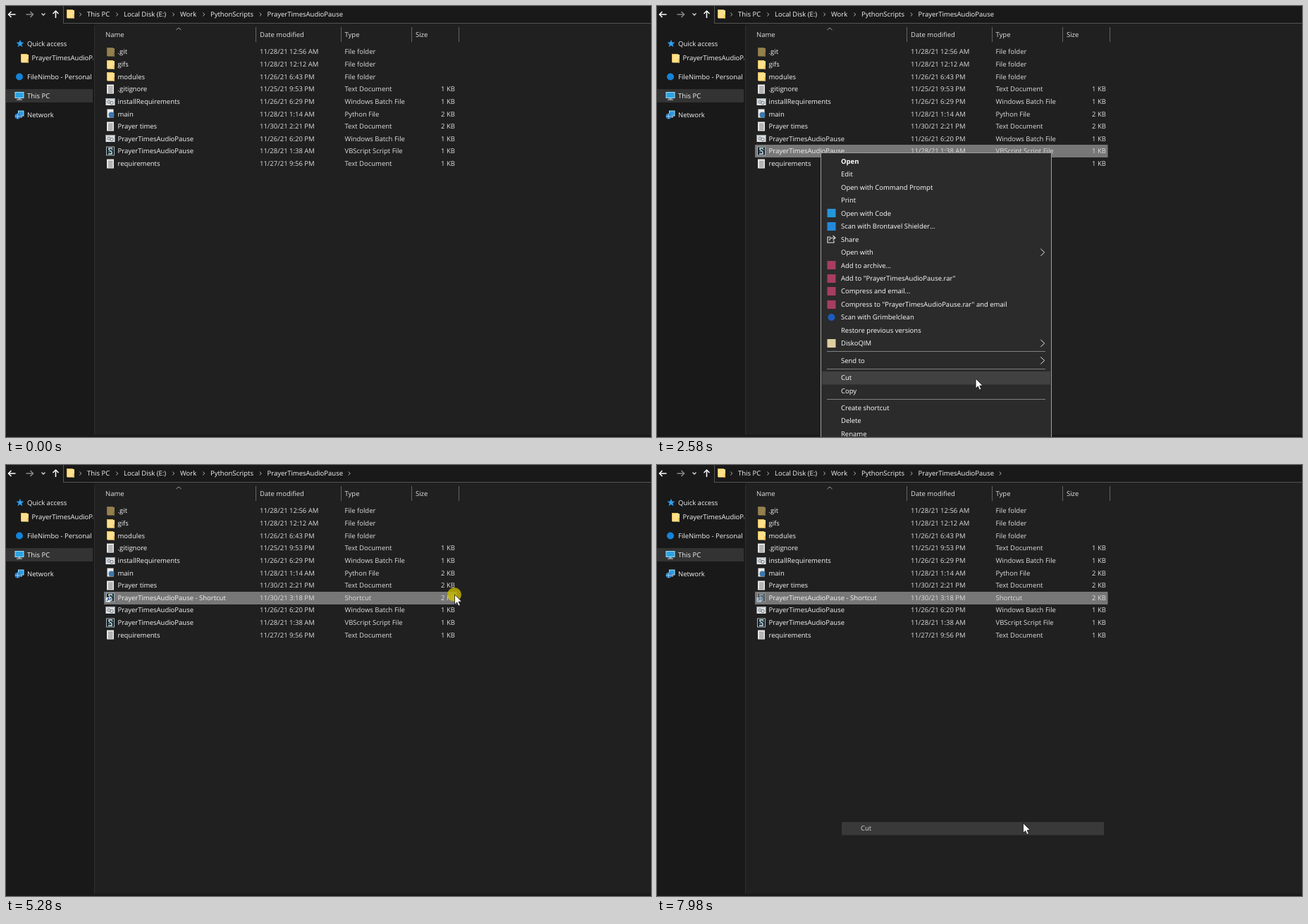
Write an HTML page with a canvas that moves like this. It is 915x612 px and loops after 8 s.

```html
<!DOCTYPE html>
<html lang="en">
<head>
<meta charset="utf-8">
<title>File manager</title>
<style>
html, body { margin: 0; width: 100%; height: 100%; overflow: hidden; background: #202020; }
canvas { display: block; }
</style>
</head>
<body>
<canvas id="stage" width="915" height="612"></canvas>
<script>
const LOOP = 8000;
const ctx = document.getElementById('stage').getContext('2d');
const FONT = '9.5px "Open Sans", "Noto Sans", sans-serif';
const BOLD = 'bold ' + FONT;
const ROW_TOP = 56.3, ROW_H = 17.62, ITEM_H = 18.45, SEP_H = 6;

// ---- drawing helpers ----
function box(x, y, w, h, color) {
  ctx.fillStyle = color;
  ctx.fillRect(x, y, w, h);
}
function disc(x, y, r, color) {
  ctx.fillStyle = color;
  ctx.beginPath();
  ctx.arc(x, y, r, 0, Math.PI * 2);
  ctx.fill();
}
function line(points, color, width = 1) {
  ctx.strokeStyle = color;
  ctx.lineWidth = width;
  ctx.beginPath();
  points.forEach(([x, y]) => ctx.lineTo(x, y));
  ctx.stroke();
}
function poly(points, color) {
  ctx.fillStyle = color;
  ctx.beginPath();
  points.forEach(([x, y]) => ctx.lineTo(x, y));
  ctx.closePath();
  ctx.fill();
}
function text(str, x, midY, color = '#f4f4f4', font = FONT, align = 'left') {
  ctx.font = font;
  ctx.textAlign = align;
  ctx.fillStyle = color;
  ctx.fillText(str, x, Math.round(midY + 3.3));
}
function chevron(x, y, dx, dy, color, width = 1) {
  line([[x - dx, y - dy], [x + dx, y], [x - dx, y + dy]], color, width);
}

// ---- icons, centred on x, y ----
const icons = {
  folder(x, y, front = '#ffe08c', back = '#e9bf55') {
    box(x - 5, y - 6, 9, 12, back);
    box(x - 4, y - 5, 10, 11.5, front);
    box(x + 4, y + 1, 2, 5.5, back);
  },
  hidden(x, y) { icons.folder(x, y, '#94804f', '#85703f'); },
  doc(x, y) {
    box(x - 5, y - 6.5, 10, 13, '#e6e6e6');
    for (let i = 0; i < 5; i++) box(x - 3, y - 4 + i * 2, 6.5, 1, '#858585');
  },
  batch(x, y) {
    box(x - 6.5, y - 5, 13, 10, '#dfe3e6');
    box(x - 6.5, y - 5, 13, 1.5, '#aab2b8');
    ctx.strokeStyle = '#70777d';
    ctx.lineWidth = 1;
    for (const [dx, r] of [[-2, 2], [2, 2.2]]) {
      ctx.beginPath();
      ctx.arc(x + dx, y + dx / 3 + 0.8, r, 0, 7);
      ctx.stroke();
    }
  },
  python(x, y) {
    box(x - 4.5, y - 6.5, 9, 12, '#ececec');
    disc(x + 1.5, y + 1.5, 4, '#3d78ad');
  },
  script(x, y) {
    box(x - 6, y - 6.5, 12, 13, '#a9b5bb');
    box(x - 5, y - 5.5, 10, 11, '#16242c');
    line([[x + 3, y - 4], [x - 2, y - 4], [x - 2, y - 2], [x + 2, y + 1], [x + 2, y + 4], [x - 3, y + 4]], '#d5e4e8', 1.4);
    line([[x - 3, y + 1], [x, y + 1]], '#7fc0cb');
    line([[x + 1, y - 2], [x + 4, y - 2]], '#7fc0cb');
  },
  shortcut(x, y) {
    icons.script(x, y);
    box(x - 6.5, y, 6.5, 6.5, '#f3f6f8');
    line([[x - 5, y + 5], [x - 2, y + 2]], '#1766b3', 1.3);
    line([[x - 4.2, y + 1.6], [x - 1.6, y + 1.6], [x - 1.6, y + 4.2]], '#1766b3', 1.2);
  },
  monitor(x, y) {
    box(x - 6.5, y - 5.5, 13, 9, '#9fdcf7');
    box(x - 5.5, y - 4.5, 11, 7, '#2ba3e3');
    box(x - 1.5, y + 3.5, 3, 1.5, '#9ab');
    box(x - 4, y + 5, 8, 1, '#cdd8de');
  },
  network(x, y) {
    box(x - 2, y - 6, 8.5, 8, '#9fdcf7');
    box(x - 1, y - 5, 6.5, 6, '#2b9be0');
    box(x + 1, y + 2, 3, 2, '#9ab');
    disc(x - 2.5, y + 2, 4, '#2f7fc4');
    line([[x - 6, y + 2], [x + 1, y + 2]], '#a5d8f5', 0.8);
    line([[x - 2.5, y - 1.5], [x - 2.5, y + 5.5]], '#a5d8f5', 0.8);
  },
  star(x, y) {
    const pts = [];
    for (let i = 0; i < 10; i++) {
      const r = i % 2 ? 2.4 : 5.8, a = i * Math.PI / 5 - Math.PI / 2;
      pts.push([x + r * Math.cos(a), y + r * Math.sin(a)]);
    }
    poly(pts, '#2f9ff0');
  },
  share(x, y) {
    line([[x - 1, y - 3], [x - 5.5, y - 3], [x - 5.5, y + 5], [x + 3.5, y + 5], [x + 3.5, y + 2]], '#e8e8e8', 1.1);
    line([[x - 3, y + 2], [x - 2, y - 0.8], [x + 1, y - 1.8], [x + 5, y - 1.8]], '#e8e8e8', 1.1);
    line([[x + 2, y - 5], [x + 5.5, y - 1.8], [x + 2, y + 1.4]], '#e8e8e8', 1.1);
  },
  cloud(x, y) { disc(x, y, 5, '#1583d8'); },
  code(x, y) { box(x - 6, y - 6, 12, 12, '#2496dc'); },
  guard(x, y) { box(x - 6, y - 6, 12, 12, '#2389dd'); },
  archive(x, y) { box(x - 6, y - 6, 12, 12, '#a63d62'); },
  scan(x, y) { disc(x, y, 5, '#1c5cc0'); },
  disk(x, y) { box(x - 6, y - 6, 12, 12, '#dfcfa0'); }
};

// ---- content ----
const APP = 'PrayerTimesAudioPause';
const TXT = 'Text Document', BAT = 'Windows Batch File', DIR = 'File folder';
const files = [
  ['hidden', '.git', '11/28/21 12:56 AM', DIR, ''],
  ['folder', 'gifs', '11/28/21 12:12 AM', DIR, ''],
  ['folder', 'modules', '11/26/21 6:43 PM', DIR, ''],
  ['doc', '.gitignore', '11/25/21 9:53 PM', TXT, '1 KB'],
  ['batch', 'installRequirements', '11/26/21 6:29 PM', BAT, '1 KB'],
  ['python', 'main', '11/28/21 1:14 AM', 'Python File', '2 KB'],
  ['doc', 'Prayer times', '11/30/21 2:21 PM', TXT, '2 KB'],
  ['batch', APP, '11/26/21 6:20 PM', BAT, '1 KB'],
  ['script', APP, '11/28/21 1:38 AM', 'VBScript Script File', '1 KB'],
  ['doc', 'requirements', '11/27/21 9:56 PM', TXT, '1 KB']
];
const link = ['shortcut', APP + ' - Shortcut', '11/30/21 3:18 PM', 'Shortcut', '2 KB'];

const SEP = ['-'];
const CMD = ['Open with Command Prompt'], CODE = ['Open with Code', 'code'];
const GUARD = ['Scan with Brontavel Shielder...', 'guard'];
const SCAN = ['Scan with Grimbelclean', 'scan'], DISK = ['DiskoQIM', 'disk', true];
const OPEN_WITH = ['Open with', '', true], RESTORE = ['Restore previous versions'];
const pack = name => [
  ['Add to archive...', 'archive'], [`Add to "${name}.rar"`, 'archive'],
  ['Compress and email...', 'archive'], [`Compress to "${name}.rar" and email`, 'archive']
];
const tail = [SEP, ['Send to', '', true], SEP, ['Cut'], ['Copy'], SEP,
  ['Create shortcut'], ['Delete'], ['Rename'], SEP];

function makeMenu(x, y, w, open, close, pick, list) {
  let top = y + 3.4;
  const items = list.map(([label, icon, sub]) => {
    const h = label === '-' ? SEP_H : ITEM_H;
    const item = { label, icon, sub, top, h };
    top += h;
    return item;
  });
  return { x, y, w, open, close, pick, items };
}
const menus = [
  makeMenu(232, 208, 328, 1710, 3120, 'Create shortcut', [
    ['Open'], ['Edit'], CMD, ['Print'], CODE, GUARD, ['Share', 'share'], OPEN_WITH,
    ...pack(APP), SCAN, RESTORE, DISK, ...tail]),
  makeMenu(260, 184, 376, 5950, 7850, 'Cut', [
    ['Open'], ['Open file location'], ...pack(APP + ' - Shortcut'), ['Edit'], CMD, ['Print'],
    CODE, GUARD, OPEN_WITH, SEP, DISK, SEP, SCAN, RESTORE, ...tail])
];

// ---- pointer: time, x, y ----
const path = [
  [70, 863, 598], [250, 765, 450], [450, 650, 318], [650, 580, 232], [830, 557, 207.5],
  [900, 559, 207.5], [1780, 559, 207.5], [2100, 546, 236], [2300, 515, 350], [2500, 462, 506],
  [2640, 444, 545], [2790, 434, 571], [3470, 434, 572], [3540, 438, 560], [3700, 480, 438],
  [3880, 542, 304], [4100, 575, 255], [4400, 603, 205], [4740, 620, 176], [4940, 633, 181],
  [5080, 636, 183.5], [6220, 636, 183.5], [6400, 612, 222], [6560, 589, 263], [6800, 566, 365],
  [7040, 542, 456], [7300, 526, 490], [7650, 519, 508], [8000, 519, 508]
];
const clicks = [[1100, 1190], [1440, 1510], [5280, 5350], [5560, 5680]];

function pointerAt(t) {
  if (t < path[0][0]) return null;
  let i = 1;
  while (i < path.length - 1 && path[i][0] < t) i++;
  const [t0, x0, y0] = path[i - 1], [t1, x1, y1] = path[i];
  const k = (t - t0) / (t1 - t0);
  return { x: x0 + (x1 - x0) * k, y: y0 + (y1 - y0) * k };
}

// ---- window parts ----
function drawFrame(t) {
  box(0, 0, 915, 612, '#202020');
  box(0, 0, 915, 25, '#191919');
  box(0, 25, 125, 587, '#191919');
  box(125, 29, 1, 583, '#303030');
  box(0, 609, 915, 3, '#191919');
  box(81, 0, 1, 24, '#535353');
  box(81, 24, 834, 1, '#535353');

  const arrow = (x, y, dx, dy, color) => {
    line([[x - dx * 5, y - dy * 5], [x + dx * 5, y + dy * 5]], color, 1.5);
    const hx = x + dx * 5, hy = y + dy * 5;
    line([[hx - dx * 4 - dy * 4, hy - dy * 4 - dx * 4], [hx, hy],
      [hx - dx * 4 + dy * 4, hy - dy * 4 + dx * 4]], color, 1.5);
  };
  arrow(8.5, 12, -1, 0, '#fff');
  arrow(33.5, 12, 1, 0, '#8a8a8a');
  arrow(70.5, 12, 0, -1, '#fff');
  line([[50.5, 10.5], [53, 13], [55.5, 10.5]], '#ddd', 1.3);

  icons.folder(91, 11);
  const crumbs = [['This PC', 115], ['Local Disk (E:)', 167], ['Work', 247], ['PythonScripts', 290], [APP, 370.5]];
  for (const [label, x] of crumbs) {
    chevron(x - 9.5, 12, 1.2, 2.5, '#b5b5b5');
    text(label, x, 12);
  }
  if (t >= 3700) chevron(487, 12, 1.2, 2.5, '#b5b5b5');

  box(0, 118, 123, 19, '#333');
  const places = [['star', 20, 53.5, 'Quick access'], ['folder', 26, 74, APP], ['cloud', 19, 100.5, 'FileNimbo - Personal'],
    ['monitor', 19, 127.5, 'This PC'], ['network', 19, 154.5, 'Network']];
  ctx.save();
  ctx.beginPath();
  ctx.rect(0, 25, 124, 587);
  ctx.clip();
  for (const [icon, x, y, label] of places) {
    icons[icon](x, y);
    text(label, icon === 'folder' ? 36.5 : 30, y);
  }
  ctx.restore();

  const heads = [['Name', 141], ['Date modified', 360], ['Type', 480.5], ['Size', 581]];
  for (const [label, x] of heads) text(label, x, 41, '#e2e2e2');
  for (const x of [354, 475, 575, 642]) box(x, 30, 1, 21, '#636363');
  line([[241.5, 34], [245, 31], [248.5, 34]], '#a0a0a0');
}

function drawFiles(t, p, menuOpen) {
  const list = files.slice();
  if (t >= 3190) list.splice(t < 3700 ? list.length : 7, 0, link);
  const chosen = t >= 5280 ? 'shortcut' : t >= 1100 ? 'script' : '';
  const hover = p && !menuOpen && p.x >= 139 && p.x < 640 ? Math.floor((p.y - ROW_TOP) / ROW_H) : -1;
  list.forEach(([icon, name, date, type, size], i) => {
    const top = Math.round(ROW_TOP + i * ROW_H), mid = ROW_TOP + (i + 0.5) * ROW_H;
    if (icon === chosen) box(139, top, 500.5, 18, '#777');
    else if (i === hover) box(138.5, top, 501.5, 18, '#4d4d4d');
    ctx.globalAlpha = icon === 'shortcut' && t >= 7980 ? 0.55 : 1;
    icons[icon](148, Math.round(mid));
    ctx.globalAlpha = 1;
    text(name, 158.5, mid);
    text(date, 360, mid, '#dedede');
    text(type, 480.5, mid, '#dedede');
    text(size, 637, mid, '#dedede', FONT, 'right');
  });
}

function drawItem(m, item, hot) {
  const mid = item.top + item.h / 2;
  if (item.label === '-') {
    box(m.x + 9, Math.round(mid) - 1, m.w - 18, 1, '#808080');
    return;
  }
  if (hot) box(m.x + 2, Math.round(item.top), m.w - 4, 18.5, '#414141');
  if (item.icon) icons[item.icon](m.x + 15.5, Math.round(mid));
  text(item.label, m.x + 29, mid, '#fff', item.label === 'Open' ? BOLD : FONT);
  if (item.sub) chevron(m.x + m.w - 13, mid, 2.7, 5, '#e8e8e8');
}

function drawMenu(m, t, p) {
  if (t >= m.open && t < m.close) {
    ctx.globalAlpha = Math.min(1, 0.4 + (t - m.open) / 330);
    box(m.x, m.y, m.w, 612 - m.y, '#a0a0a0');
    box(m.x + 1, m.y + 1, m.w - 2, 612 - m.y, '#2b2b2b');
    for (const item of m.items) {
      const over = p.x > m.x && p.x < m.x + m.w - 1 && p.y >= item.top && p.y < item.top + item.h;
      drawItem(m, item, over);
    }
  } else if (t >= m.close && t < m.close + 260) {
    // the chosen entry lingers and fades after the menu closes
    ctx.globalAlpha = t < m.close + 70 ? 1 : Math.max(0, 1 - (t - m.close - 70) / 280);
    drawItem(m, m.items.find(i => i.label === m.pick), true);
  }
  ctx.globalAlpha = 1;
}

function drawPointer({ x, y }) {
  const shape = [[0, 0], [0, 14], [3.2, 11], [5.4, 16], [7.8, 15], [5.6, 10.2], [10, 10]]
    .map(([dx, dy]) => [x + 0.5 + dx, y + 0.5 + dy]);
  poly(shape, '#fff');
  line([...shape, shape[0]], '#111', 0.8);
}

function draw(t) {
  const p = pointerAt(t);
  const menuOpen = menus.some(m => t >= m.open && t < m.close);
  drawFrame(t);
  drawFiles(t, p, menuOpen);
  menus.forEach(m => drawMenu(m, t, p));
  if (!p) return;
  if (clicks.some(([a, b]) => t >= a && t < b)) disc(p.x, p.y + 0.5, 10, 'rgba(200,185,0,0.8)');
  drawPointer(p);
}

ctx.textBaseline = 'alphabetic';
ctx.textRendering = 'geometricPrecision';
const start = performance.now();
function tick() {
  draw((performance.now() - start) % LOOP);
  requestAnimationFrame(tick);
}
tick();
</script>
</body>
</html>
```
